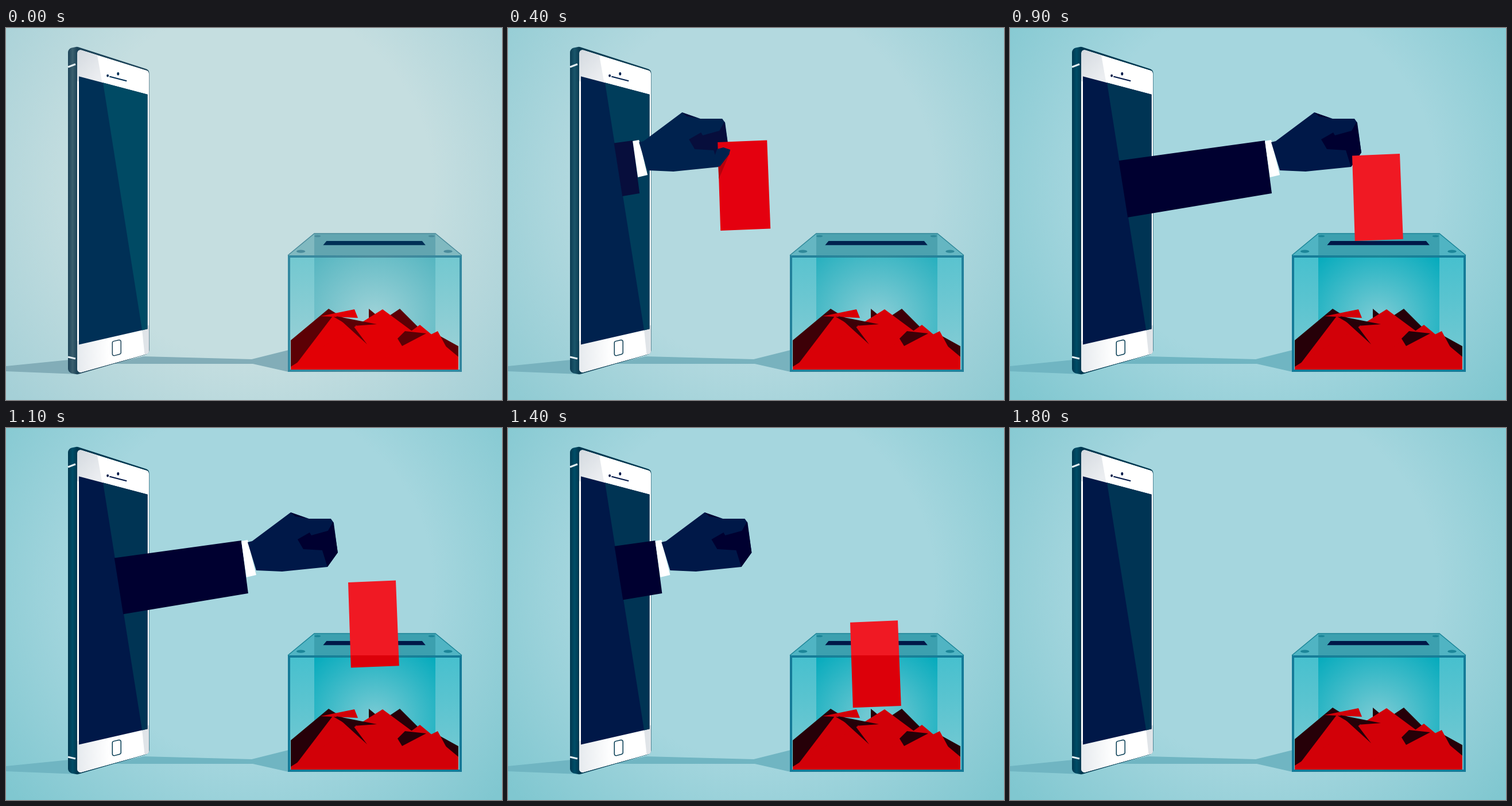
These frames come from a looping animation (864 by 648 pixels, 3900 ms). An HTML page with a canvas:

```html
<!DOCTYPE html>
<html lang="en">
<head>
<meta charset="utf-8">
<title>Mobile voting</title>
<style>
  html, body { margin: 0; width: 100%; height: 100%; overflow: hidden; }
  canvas { display: block; width: 100%; height: 100%; }
</style>
</head>
<body>
<canvas id="stage" width="864" height="648"></canvas>
<script>
const ctx = document.getElementById('stage').getContext('2d');
const LOOP = 3900, STEP = 100;
const REACHED = 7, RELEASED = 9, LANDING = 14, LAST = 18;

// Each tone fades from its first to its second colour while the arm reaches out.
const TONES = {
  wall: ['c5dee0', 'a5d6de'], corner: ['a5d0d7', '80c7d0'],
  shadow: ['82adb8', '70b5c2'], screen: ['003056', '001848'],
  glare: ['004a64', '003454'], side: ['3c606f', '004d67'],
  sideDark: ['1c4358', '003850'], sleeve: ['10204c', '000030'],
  red: ['e20005', 'd20008'], dark: ['5c0005', '260008'],
  edge: ['3288a0', '147a98'], rim: ['4a8b9b', '1b8598'],
  lid: ['62a5b0', '3ca0af'], lidSide: ['80b9c0', '50b4c3'],
  pane: ['72c8d0', '46c0ce'], haze: ['98d0d6', '70c8d2'],
  back: ['54b5c0', '02aabc']
};

const lerp = (a, b, k) => a + (b - a) * k;
const mix = (a, b, k) => a.map((v, i) => lerp(v, b[i], k));
const channels = hex => [0, 2, 4].map(i => parseInt(hex.slice(i, i + 2), 16));

function palette(step) {
  const k = Math.min(1, step / REACHED);
  return Object.fromEntries(Object.entries(TONES).map(([name, [from, to]]) =>
    [name, `rgb(${mix(channels(from), channels(to), k).map(Math.round)})`]));
}

// Maps (u, v) in the unit square onto a four-cornered surface.
const surface = (tl, tr, bl, br) => (u, v) => mix(mix(tl, tr, u), mix(bl, br, u), v);
const face = surface([124, 36], [249, 75], [124, 602], [249, 567]);
const lid = surface([537, 358], [748, 358], [491, 396], [794, 396]);
const patch = (on, u0, v0, u1, v1) => [on(u0, v0), on(u1, v0), on(u1, v1), on(u0, v1)];

const SCREEN_TOP = .084, SCREEN_BOTTOM = .912;
const glareTop = face(.36, SCREEN_TOP), glareBottom = face(.905, SCREEN_BOTTOM);
const glareX = y => lerp(glareTop[0], glareBottom[0],
  (y - glareTop[1]) / (glareBottom[1] - glareTop[1]));

const shape = points => new Path2D(`M${points.join(' ')}Z`);

function fill(points, paint) {
  ctx.fillStyle = paint;
  ctx.fill(shape(points));
}

function rounded(points, radius) {
  const path = new Path2D();
  path.moveTo(...mix(points.at(-1), points[0], .5));
  points.forEach((p, i) => path.arcTo(...p, ...points[(i + 1) % points.length], radius));
  path.closePath();
  return path;
}

function line(points, paint, width) {
  ctx.strokeStyle = paint;
  ctx.lineWidth = width;
  ctx.stroke(new Path2D(`M${points.join(' ')}`));
}

function oval([x, y], rx, ry, paint) {
  ctx.fillStyle = paint;
  ctx.beginPath();
  ctx.ellipse(x, y, rx, ry, 0, 0, 7);
  ctx.fill();
}

function ramp(gradient, ...colors) {
  colors.forEach((color, i) => gradient.addColorStop(i / (colors.length - 1), color));
  return gradient;
}

function drawBackground(c) {
  ctx.fillStyle = ramp(ctx.createRadialGradient(434, 270, 308, 434, 270, 560), c.wall, c.corner);
  ctx.fillRect(0, 0, 864, 648);
  fill([0, 589, 110, 578, 124, 603, 0, 598], c.shadow);
  fill([180, 585, 240, 572, 428, 577, 492, 561, 492, 599, 430, 585], c.shadow);
}

function drawPhone(c) {
  const body = rounded([[108, 36], [124, 32.5], [249.5, 73], [249.5, 567], [124, 603.5], [108, 600]], 8);
  ctx.fillStyle = ramp(ctx.createLinearGradient(108, 0, 124, 0), c.sideDark, c.side, c.sideDark);
  ctx.fill(body);

  const front = rounded(patch(face, 0, 0, 1, 1), 6);
  ctx.save();
  ctx.clip(front);
  ctx.fillStyle = '#fff';
  ctx.fill(front);
  fill([face(0, 0), face(.28, 0), face(.36, .1), face(0, .1)],
    ramp(ctx.createLinearGradient(124, 40, 168, 80), '#d4dae0', '#eceef1'));
  fill(patch(face, 0, .9, .9, 1),
    ramp(ctx.createLinearGradient(124, 0, 236, 0), '#e6eaee', '#fff', '#fff'));
  fill([face(.9, .9), face(1, .9), face(1, 1), face(.94, 1)], '#e0e4e8');
  ctx.restore();

  fill(patch(face, .024, SCREEN_TOP, .98, SCREEN_BOTTOM), c.screen);
  fill([glareTop, face(.98, SCREEN_TOP), face(.98, SCREEN_BOTTOM), glareBottom], c.glare);

  for (const [y, rise] of [[68, -5], [573, 3]]) line([108, y, 121, y + rise], '#e6f0f3', 3);
  line([face(.45, .058), face(.69, .057)], c.screen, 2.2);
  oval(face(.425, .057), 2, 2.4, c.screen);
  oval(face(.57, .041), 2, 2.8, c.screen);
  ctx.strokeStyle = c.sideDark;
  ctx.lineWidth = 1.5;
  ctx.stroke(rounded(patch(face, .49, .927, .61, .975), 3));
}

function drawBox(c) {
  ctx.fillStyle = ramp(ctx.createLinearGradient(0, 396, 0, 560), c.pane, c.haze);
  ctx.fillRect(492, 396, 302, 202);
  ctx.fillStyle = ramp(ctx.createRadialGradient(642, 510, 20, 642, 510, 155), c.haze, c.back);
  ctx.fillRect(537, 396, 211, 202);

  fill(patch(lid, 0, 0, 1, 1), c.lidSide);
  ctx.fillStyle = c.lid;
  ctx.fillRect(537, 358, 211, 38);
  for (const u of [.05, .945]) {
    oval(lid(u, .82), 7.5, 2.6, c.rim);
    oval(lid(u, .12), 5.5, 1.8, c.rim);
  }
  line([lid(0, 1), lid(0, 0), lid(1, 0), lid(1, 1)], c.rim, 1.5);
  fill(patch(lid, .153, .34, .84, .53), c.screen);

  ctx.strokeStyle = ramp(ctx.createLinearGradient(491, 0, 794, 0), c.edge, c.rim, c.edge);
  ctx.lineWidth = 4;
  ctx.strokeRect(493, 398, 299, 199);
}

function drawPile(c, lift) {
  const heap = (x, y, left, right, paint) => {
    const drop = 620 - y;
    fill([x, y, x + right * drop, 620, x - left * drop, 620], paint);
  };
  ctx.save();
  ctx.beginPath();
  ctx.rect(496, 400, 292, 195);
  ctx.clip();
  ctx.translate(0, -lift);

  heap(562, 489, 1.2, 1.6, c.dark);
  heap(632, 489, 0, 1.2, c.dark);
  heap(686, 489, 1.5, 1, c.dark);
  heap(755, 536, 1, 1.8, c.dark);
  fill([548, 502, 607, 490, 613, 505], c.red);
  heap(569, 502, .76, 1.7, c.red);
  heap(656, 490, 1.6, 1.35, c.red);
  heap(721, 517, 1.4, 1.2, c.red);
  heap(752, 528, 2, .54, c.red);
  fill([575, 502, 646, 516, 605, 519, 629, 551], c.dark);
  fill([682, 541, 695, 528, 732, 532, 690, 554], c.dark);
  ctx.restore();
}

const cardShape = (x, y, size) => shape(
  [[0, 0], [86, -3.5], [92, 150.5], [5, 154]].map(([dx, dy]) => [x + dx * size, y + dy * size]));

function drawArm(c, x, holding) {
  ctx.save();
  ctx.clip(shape([glareX(0) - 1, 0, 864, 0, 864, 648, glareX(648) - 1, 648]));
  ctx.translate(x, 0);
  const length = 400;
  fill([-86, 196, -74, 288, -74 - length, 288 + .167 * length, -86 - length, 196 + .138 * length], c.sleeve);
  fill([-86, 197, -75, 195, -60, 256, -77, 260], '#fff');
  fill([-75, 199, -67, 197, 0, 147, 32, 158, 70, 158, 75, 165, 82, 217, 64, 242, -15, 250, -60, 248], c.screen);
  fill([12, 194, 33, 182, 36, 187, 65, 179, 74, 163, 82, 217, 64, 242, 55, 213, 22, 211], c.sleeve);
  fill([0, 147, 28, 157, 8, 154], c.sleeve);
  if (holding) {
    ctx.fillStyle = '#e4000f';
    ctx.fill(cardShape(62, 199, 1));
    fill([83, 218, 64, 263, 63, 236], '#b4000c');
    fill([61, 211, 72, 208, 84, 212, 82, 220, 66, 241, 50, 242], c.screen);
  }
  ctx.restore();
}

function drawFallingCard(y) {
  const card = cardShape(596, y, .965);
  ctx.save();
  ctx.clip(card);
  ctx.fillStyle = '#f01923';
  ctx.fillRect(590, 200, 100, 196);
  ctx.fillStyle = '#dc000a';
  ctx.fillRect(590, 396, 100, 200);
  ctx.restore();
}

function armX(step) {
  if (step < RELEASED) return 530 - 75.6 * Math.max(0, REACHED - step);
  return 530 - 9.4 * (step - RELEASED) ** 1.86;
}

function cardY(step) {
  return 222.5 + 23.25 * (Math.min(step, LANDING) - RELEASED) + 42 * Math.max(0, step - LANDING);
}

function draw(step) {
  const c = palette(step);
  const settled = step === LAST;
  drawBackground(c);
  drawPhone(c);
  drawBox(c);
  if (!settled) drawArm(c, armX(step), step < RELEASED);
  if (!settled && step >= RELEASED) drawFallingCard(cardY(step));
  drawPile(c, settled ? 2 : 0);
}

const start = performance.now();
function tick() {
  const time = (performance.now() - start) % LOOP;
  draw(Math.min(LAST, Math.floor(time / STEP)));
  requestAnimationFrame(tick);
}
tick();
</script>
</body>
</html>
```
